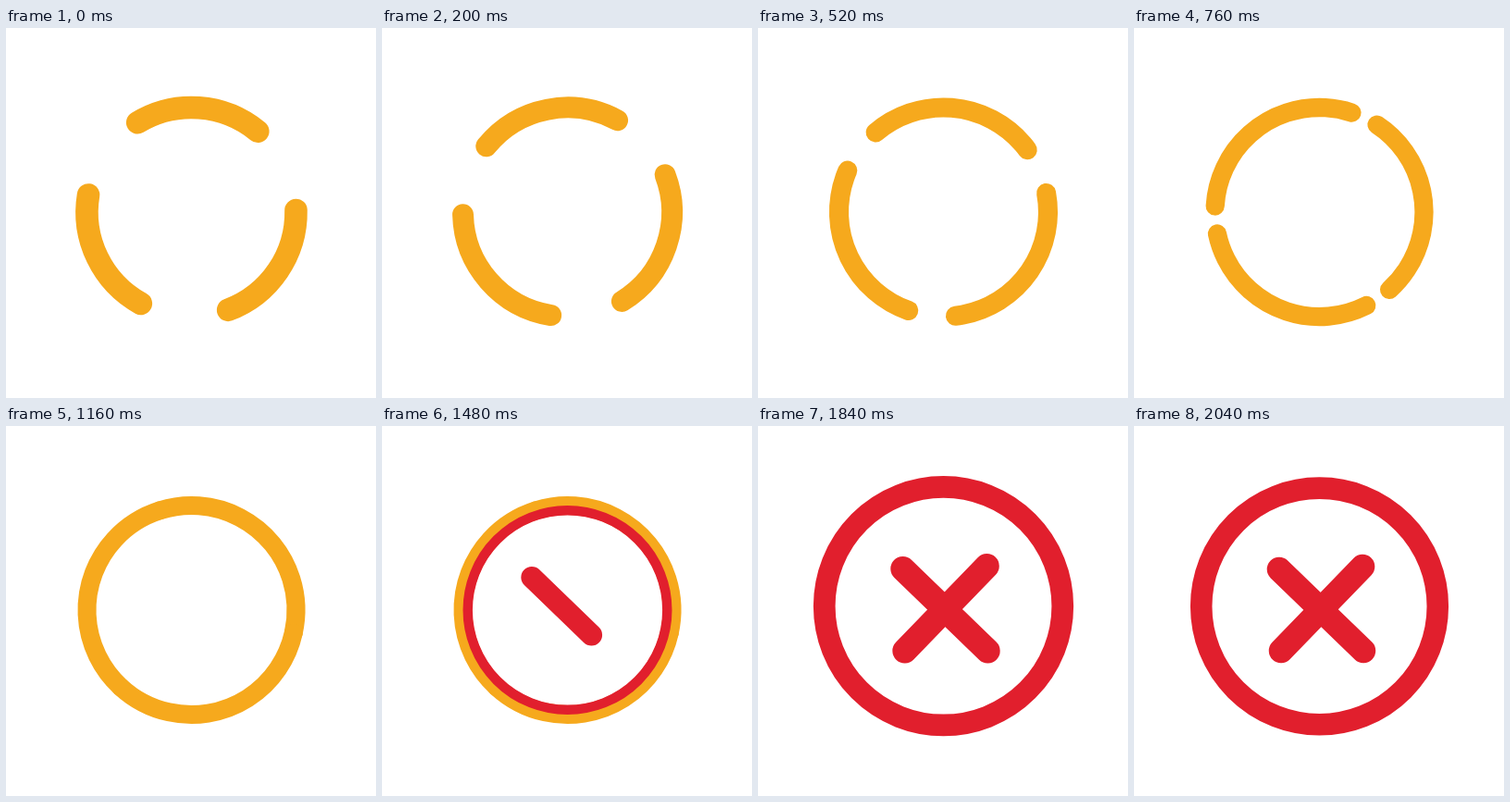
These frames come from a looping animation (400x400 px, 2280 ms). An HTML page with a canvas:

```html
<!DOCTYPE html>
<html lang="en">
<head>
<meta charset="utf-8">
<title>Loader to error</title>
<style>
html, body { margin: 0; width: 100%; height: 100%; overflow: hidden; background: #fff; }
canvas { display: block; }
</style>
</head>
<body>
<canvas id="stage" width="400" height="400"></canvas>
<script>
const ctx = document.getElementById('stage').getContext('2d');
const LOOP = 2280, STEP = 40, REST = 2040;
const YELLOW = '#f6a91d', RED = '#e11f2d';
const CX = 200.5, CY = 199, PIVOT_Y = 230, RADIUS = 113, INNER = 102.6;
const rad = deg => deg * Math.PI / 180;
const progress = (t, from, to) => Math.min(1, Math.max(0, (t - from) / (to - from)));
const smooth = p => (1 - Math.cos(Math.PI * p)) / 2;

function stroke(color, width) {
  ctx.strokeStyle = color;
  ctx.lineWidth = width;
  ctx.stroke();
}

function arc(radius, from, to, color, width) {
  ctx.beginPath();
  ctx.arc(CX, CY, radius, rad(from), rad(to));
  stroke(color, width);
}

function bar(x1, y1, x2, y2, p) {
  if (!p) return;
  ctx.beginPath();
  ctx.moveTo(x1, y1);
  ctx.lineTo(x1 + (x2 - x1) * p, y1 + (y2 - y1) * p);
  stroke(RED, 23.4);
}

// Three spinning arcs lengthen and thin out until they close into a ring.
function drawLoader(t) {
  const spin = Math.min(t, 1100);
  const middle = 274.2 + 0.559 * spin - 0.000179 * spin * spin;
  const half = Math.min(120, 70.5 + 0.045 * t) / 2;
  const width = 20 + 4.6 * (1 - progress(t, 0, 1000)) ** 2;
  for (let i = 0; i < 3; i++) {
    const a = middle + i * 120;
    arc(RADIUS, a - half, a + half, YELLOW, width);
  }
}

// A red ring fills from the inside out while the cross is drawn.
function drawError(t) {
  const width = 20.8 * progress(t, 1320, 1640);
  if (width) arc(INNER + width / 2, 0, 360, RED, width);
  bar(162, 163.6, 242.5, 241.5, progress(t, 1320, 1520));
  bar(241.7, 161, 163.8, 241.5, progress(t, 1530, 1730));
}

function draw() {
  const now = performance.now() % LOOP;
  const t = Math.min(REST, Math.floor(now / STEP) * STEP);
  const scale = 1 + 0.142 * smooth(progress(t, 1480, 1750))
                  - 0.011 * smooth(progress(t, 1750, REST));
  ctx.fillStyle = '#fff';
  ctx.fillRect(0, 0, 400, 400);
  ctx.save();
  ctx.lineCap = 'round';
  ctx.translate(CX, PIVOT_Y);
  ctx.scale(scale, scale);
  ctx.translate(-CX, -PIVOT_Y);
  if (t < 1640) drawLoader(t);
  drawError(t);
  ctx.restore();
  requestAnimationFrame(draw);
}
draw();
</script>
</body>
</html>
```
